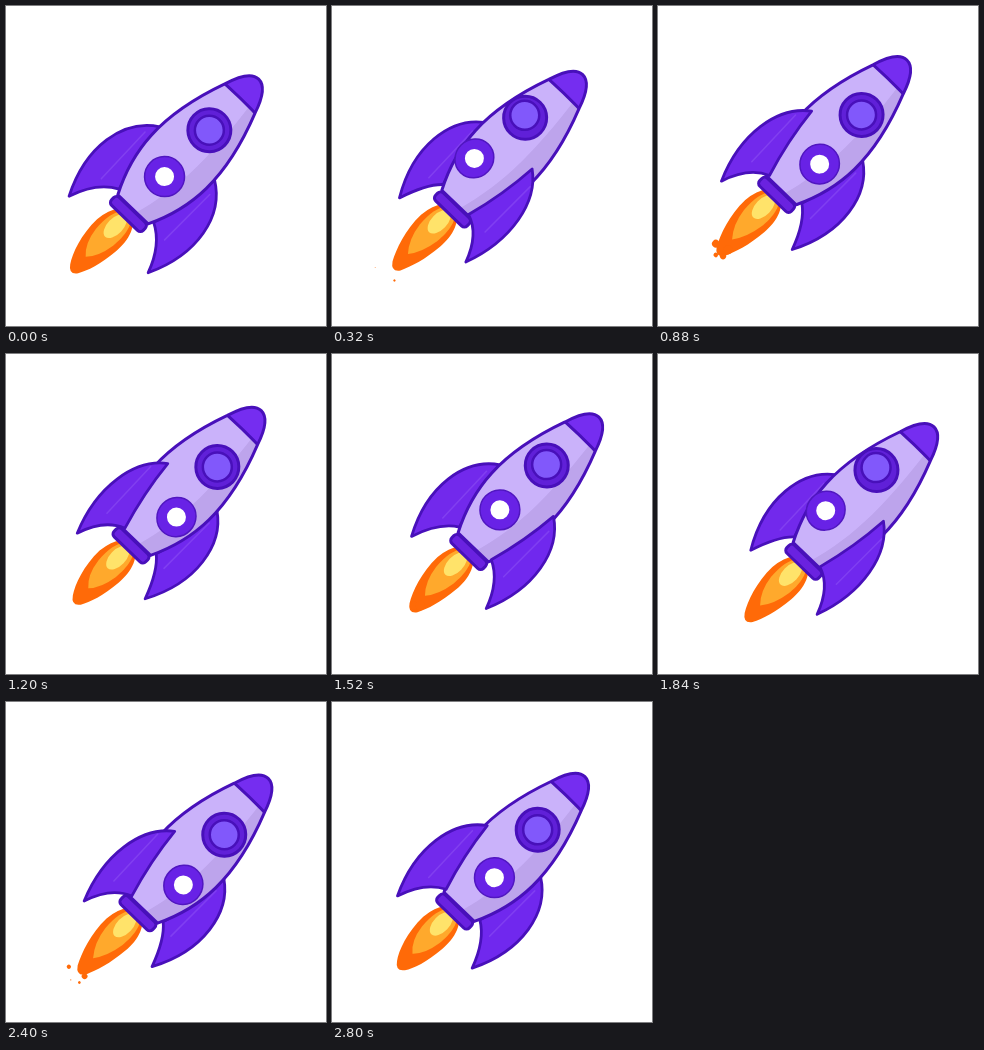
An HTML page with a canvas for the animation above (2880 ms loop, 320 by 320 pixels).

```html
<!DOCTYPE html>
<html lang="en">
<head>
<meta charset="utf-8">
<title>Rocket</title>
<style>
  html, body { margin: 0; width: 100%; height: 100%; overflow: hidden; background: #fff; }
  canvas { display: block; width: 320px; height: 320px; }
</style>
</head>
<body>
<canvas id="stage" width="320" height="320"></canvas>
<script>
const ctx = document.getElementById('stage').getContext('2d');
const LOOP = 2880, STEP = 80, BURST = 720;
const OUTLINE = '#4810ba';

// Drift of the rocket, evenly spaced around the loop
const driftX = [-1, -3, -5, -4, 4, 16, 23, 16.5, 1];
const driftY = [-0.5, -5, -15.5, -20, -15.5, -8.5, 1, 0, 5];

// Periodic Catmull-Rom interpolation, u in 0..1
function spline(keys, u) {
  const n = keys.length, pos = u * n, i = Math.floor(pos), f = pos - i;
  const [a, b, c, d] = [-1, 0, 1, 2].map(k => keys[(i + k + n) % n]);
  return b + f / 2 * (c - a + f * (2 * a - 5 * b + 4 * c - d + f * (3 * (b - c) + d - a)));
}

function paint(path, fill, stroke, width = 3) {
  if (fill) { ctx.fillStyle = fill; ctx.fill(path); }
  if (stroke) { ctx.strokeStyle = stroke; ctx.lineWidth = width; ctx.stroke(path); }
}

function oval(x, y, rx, ry, fill, stroke, width) {
  const path = new Path2D();
  path.ellipse(x, y, rx, ry, 0, 0, Math.PI * 2);
  paint(path, fill, stroke, width);
}

const hull = new Path2D(`M-21 -10 C-41 -50 -47 -95 -21 -164 C-16 -180 -9 -191 0 -191
  C9 -191 16 -180 21 -164 C47 -95 41 -50 21 -10Z`);
const shade = new Path2D('M4 -8 C20 -60 20 -110 8 -200 H60 V-8Z');
const nose = new Path2D('M-40 -163 Q0 -166 40 -163 V-210 H-40Z');
const nozzle = new Path2D();
nozzle.roundRect(-22, -9, 44, 11, 4);

// side: -1 left, 1 right; turn: how far the fin has swung in; front: over the hull
function drawFin(side, turn, front) {
  const root = front ? 40 - 11 * turn : 38;
  const base = front ? 25 - 10 * turn : 24;
  const baseY = front ? 4 * turn - 15 : -15;
  const tip = 55 - 9 * turn;
  const bulge = 78 - (front ? 14 : 5) * turn;
  ctx.save();
  ctx.scale(side, 1);
  paint(new Path2D(`M${root} -88 C${bulge - 8} -68 ${bulge} -22 ${tip} 25
    Q${tip - 10} -4 ${base} ${baseY} Q${base + 11} -50 ${root} -88Z`),
    side < 0 ? '#7229ec' : '#7028ee', OUTLINE, 2.8);
  const ridge = 45 - 5 * turn;
  paint(new Path2D(`M${ridge} -74 L${ridge - 1} -10`), null, 'rgba(190,150,255,.2)', 1.5);
  ctx.restore();
}

function drawFlame(t) {
  const len = 79 + 2 * Math.sin(t / LOOP * Math.PI * 8 - 0.5);
  paint(new Path2D(`M0 -4 C14 -4 19 16 17 32 C15 52 10 66 5 ${len - 4}
    Q-1 ${len + 4} -7 ${len - 5} C-13 64 -20 44 -19 22 Q-16 -4 0 -4Z`), '#ff6a08');
  const cycle = t % BURST / BURST;
  for (let i = 0; i < 4; i++) {
    const q = (cycle - 0.05 - i * 0.05) / 0.32;
    if (q <= 0 || q >= 1) continue;
    const r = 5 * (1 - q);
    oval(Math.sin(i * 2.4) * (6 + 8 * q) - 2, 68 + 26 * q, r, r, '#ff6a08');
  }
  paint(new Path2D(`M0 -3 C11 -3 13 16 11 30 Q8 48 -1 ${len - 21}
    Q-11 48 -13 30 C-14 10 -10 -3 0 -3Z`), '#ffa92c');
  oval(-1, 14.5, 8, 14.5, '#ffe36a');
}

function draw(t) {
  const s = Math.sin(t / LOOP * Math.PI * 4);
  const turn = Math.abs(s);
  const badgeX = s > 0 ? -20 * s : -15 * s;
  const windowX = badgeX * 0.58;
  const swing = Math.max(s, 0);
  const frontSide = s > 0 ? 1 : -1;

  ctx.setTransform(1, 0, 0, 1, 0, 0);
  ctx.fillStyle = '#fff';
  ctx.fillRect(0, 0, 320, 320);
  ctx.translate(121 + spline(driftX, t / LOOP), 211 + spline(driftY, t / LOOP));
  ctx.rotate(44 * Math.PI / 180);
  ctx.lineJoin = ctx.lineCap = 'round';

  drawFlame(t);
  drawFin(-frontSide, turn, false);
  if (turn < 0.05) drawFin(frontSide, turn, false);

  paint(hull, '#cab2fa');
  ctx.save();
  ctx.clip(hull);
  paint(shade, '#bda4ec');
  paint(nose, '#752df0', OUTLINE);
  ctx.restore();
  paint(hull, null, OUTLINE);
  paint(nozzle, '#6a22e0', OUTLINE);

  oval(windowX, -120, 21.5, 21.5, '#6020d8', OUTLINE);
  oval(windowX - 2 * swing, -120 - 1.5 * swing, 14.5, 14.5, '#8158fb', OUTLINE, 2.5);
  if (turn >= 0.05) drawFin(frontSide, turn, true);
  oval(badgeX, -55.5, 20 - 1.2 * s * s, 20, '#6822e6', '#5016c0', 1.5);
  oval(badgeX, -55.5, 9.5, 9.5, '#fff');
}

function tick(now) {
  draw(Math.floor(now % LOOP / STEP) * STEP);
  requestAnimationFrame(tick);
}
requestAnimationFrame(tick);
</script>
</body>
</html>
```
